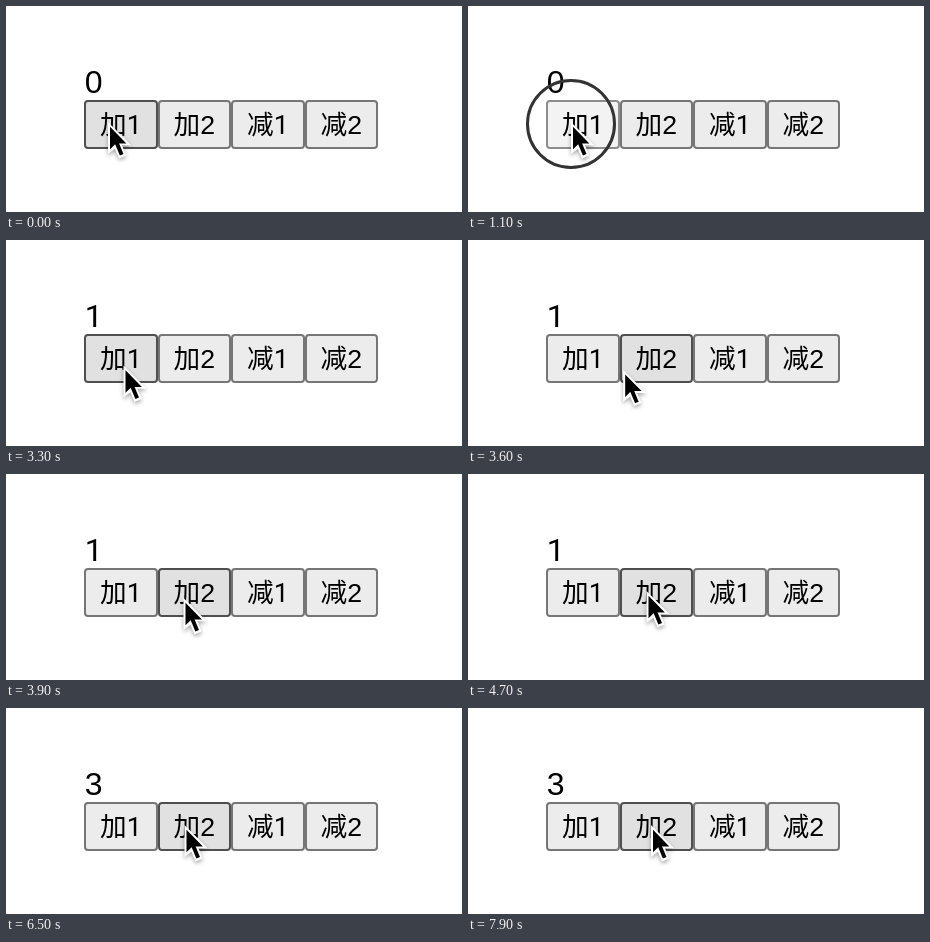
Animation of 456x206 px, one loop 8 s. Source, as an HTML page with a canvas:

```html
<!DOCTYPE html>
<html lang="zh">
<head>
<meta charset="utf-8">
<title>计数器</title>
<style>
  html, body { margin: 0; width: 100%; height: 100%; overflow: hidden; background: #fff; }
  canvas { display: block; width: 456px; height: 206px; }
</style>
</head>
<body>
<canvas id="stage"></canvas>
<script>
const W = 456, H = 206, LOOP = 8000, STEP = 100;
const canvas = document.getElementById('stage');
const ratio = window.devicePixelRatio || 1;
canvas.width = W * ratio;
canvas.height = H * ratio;
const ctx = canvas.getContext('2d');

const LABELS = ['加1', '加2', '减1', '减2'];
const LEFT = 78, PITCH = 73.5;
const STYLES = {
  idle: { fill: '#ececec', line: '#767676' },
  hover: { fill: '#e1e1e1', line: '#4f4f4f' },
  active: { fill: '#f3f3f3', line: '#8d8d8d' }
};

// Pointer moves; dip bends the path downwards
const HOME = { x: 102, y: 116 };
const MOVES = [
  { from: 100, to: 200, dx: 1, dy: 0 },
  { from: 2400, to: 2900, dx: 2.5, dy: 5 },
  { from: 3090, to: 3900, dx: 72, dy: 3, dip: 8 },
  { from: 3900, to: 4700, dx: 1, dy: -7 },
  { from: 7700, to: 7900, dx: 4.5, dy: 0 }
];

const CLICKS = [
  { ring: 1000, down: 1100, button: 0, add: 1 },
  { ring: 5500, down: 5500, button: 1, add: 2 }
];
const RING_TIME = 600, RELEASE = 700;

const edge = i => Math.round(LEFT + PITCH * i);
const smooth = p => p * p * (3 - 2 * p);
const progress = (t, a, b) => Math.min(1, Math.max(0, (t - a) / (b - a)));
const within = (t, a, length) => t >= a && t < a + length;

function pointerAt(t) {
  let { x, y } = HOME;
  for (const { from, to, dx, dy, dip = 0 } of MOVES) {
    const p = smooth(progress(t, from, to));
    x += dx * p;
    y += dy * p + dip * Math.sin(Math.PI * p);
  }
  return { x, y };
}

function fontFor(ch, size) {
  if (ch === '1') return size + 'px Roboto, sans-serif';
  if (ch > '9') return size + 'px "Noto Sans CJK SC", "Noto Sans CJK", sans-serif';
  return size + 'px "Liberation Sans", Arial, sans-serif';
}

function write(text, x, y, size) {
  ctx.fillStyle = '#000';
  for (const ch of text) {
    ctx.font = fontFor(ch, size);
    ctx.fillText(ch, x, y);
    x += ctx.measureText(ch).width;
  }
}

function drawButton(i, { fill, line }) {
  const x = edge(i), w = edge(i + 1) - x;
  ctx.beginPath();
  ctx.roundRect(x + 1, 95, w - 2, 47, 3);
  ctx.fillStyle = fill;
  ctx.fill();
  ctx.strokeStyle = line;
  ctx.lineWidth = 2;
  ctx.stroke();
  write(LABELS[i], LEFT + PITCH * i + 16, 128, 26.67);
}

const outline = new Path2D('M0 0V32L6.9 26.7 11 36.4 18.2 33.4 13.9 23.2H23.2Z');
const arrow = new Path2D('M2 4.8V27.2L8 21.4H18.4Z');
const tail = new Path2D('M5.7 18.8L9.35 17.2 15.5 32 11.9 33.5Z');

function drawPointer({ x, y }) {
  ctx.save();
  ctx.translate(x, y);
  ctx.save();
  ctx.shadowColor = 'rgba(0,0,0,.35)';
  ctx.shadowBlur = 4 * ratio;
  ctx.shadowOffsetY = 2 * ratio;
  ctx.fillStyle = '#fff';
  ctx.fill(outline);
  ctx.restore();
  ctx.fillStyle = '#000';
  ctx.fill(arrow);
  ctx.fill(tail);
  ctx.restore();
}

function drawRing({ x, y }) {
  ctx.beginPath();
  ctx.arc(x, y + 2, 43.5, 0, Math.PI * 2);
  ctx.strokeStyle = '#333';
  ctx.lineWidth = 3;
  ctx.stroke();
}

function draw(time) {
  const t = Math.floor(time / STEP) * STEP;
  const pointer = pointerAt(t);
  const hovered = Math.floor((pointer.x + 1 - LEFT) / PITCH);
  const pressed = CLICKS.some(c => within(t, c.down, RELEASE));
  const count = CLICKS.reduce((n, c) => n + (t >= c.down + RELEASE ? c.add : 0), 0);

  ctx.setTransform(ratio, 0, 0, ratio, 0, 0);
  ctx.fillStyle = '#fff';
  ctx.fillRect(0, 0, W, H);
  write(String(count), LEFT + 0.7, 87, 32);
  LABELS.forEach((_, i) => {
    const state = i !== hovered ? 'idle' : pressed ? 'active' : 'hover';
    drawButton(i, STYLES[state]);
  });
  if (CLICKS.some(c => within(t, c.ring, c.down + RELEASE - 200 - c.ring))) drawRing(pointer);
  drawPointer(pointer);
}

const start = performance.now();
function tick() {
  draw((performance.now() - start) % LOOP);
  requestAnimationFrame(tick);
}
tick();
</script>
</body>
</html>
```
